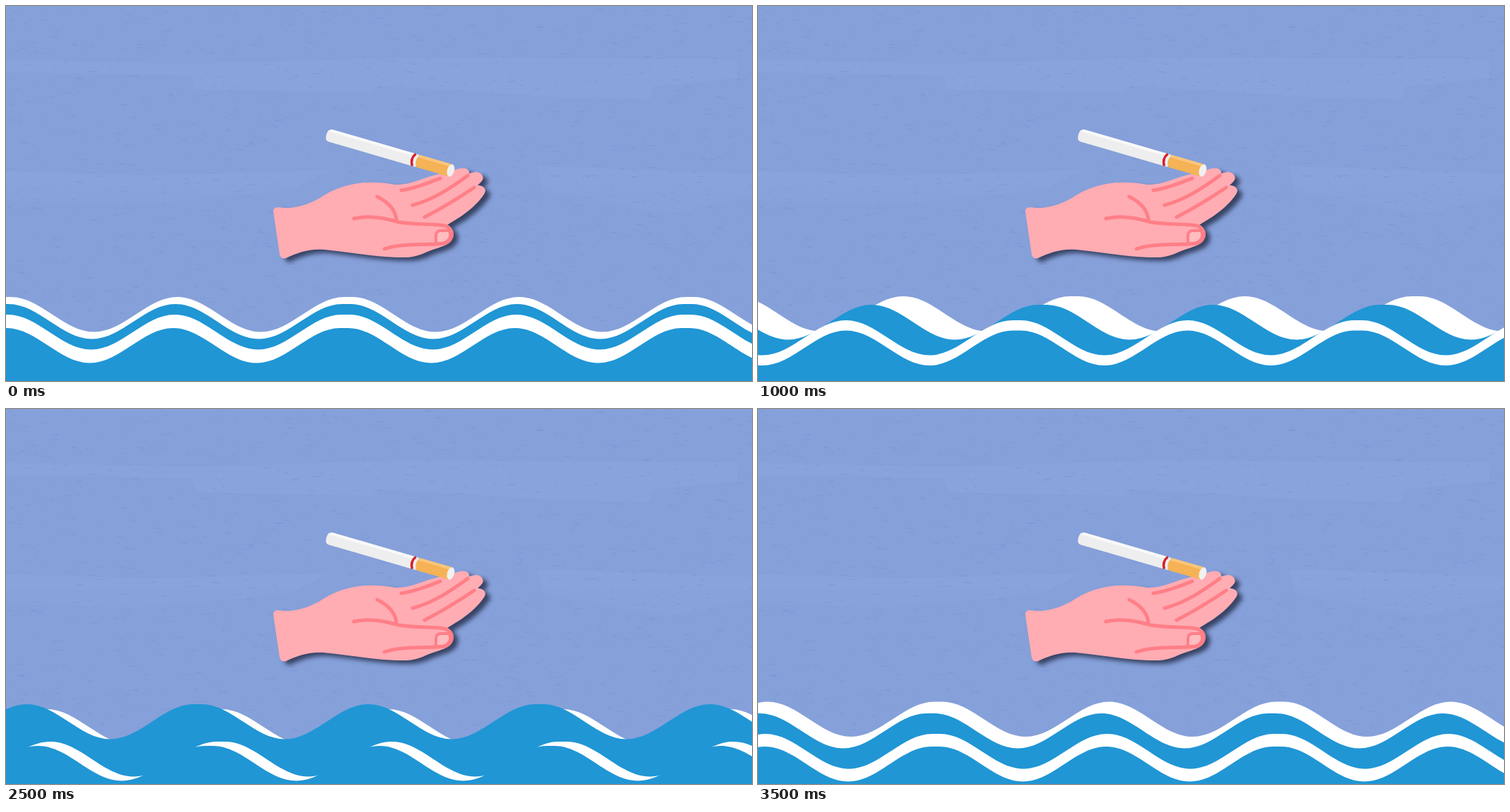
Recreate the animation shown at these times as an HTML page. Size 1055 by 531 pixels, loop 4000 ms.

```html
<!DOCTYPE html>
<html lang="en">
<head>
<meta charset="utf-8">
<title>Hand above the waves</title>
<style>
  html, body { margin: 0; width: 100%; height: 100%; overflow: hidden; background: #86a0da; }
  svg { display: block; width: 100vw; height: 100vh; }
  .hand { filter: drop-shadow(7px 5px 3px rgba(28, 36, 62, .75)); }
  .lines { fill: none; stroke: #ff7f87; stroke-width: 5; stroke-linecap: round; stroke-linejoin: round; }
</style>
</head>
<body>
<svg viewBox="0 0 1055 531" preserveAspectRatio="none">
  <rect width="1055" height="531" fill="#86a0da"/>
  <g fill="#8ba5de" opacity=".6">
    <path d="M0 76 L260 82 L560 73 L1034 75 V102 L915 114 L910 132 L780 129 L526 113 L520 123 L268 118 L262 98 L0 94Z"/>
    <path d="M0 234 L200 240 L460 232 L400 262 L180 281 L0 275Z"/>
    <path d="M750 226 L1055 238 V268 L940 294 L760 262Z"/>
  </g>
  <path id="grain" fill="none" stroke="#6f8ac8" stroke-width=".8" opacity=".5"/>

  <g id="waves"></g>

  <path class="hand" fill="#ffacb3" d="M378 291 Q378 285 384 285 L395 286 C416 286 435 278 450 268
    C480 250 515 246 550 253 C572 254 590 243 612 238 L642 230 C650 228 656 232 655 237 L664 235
    C673 235 678 243 672 249 L667 254 C674 254 680 258 677 265 C665 285 641 300 624 310
    C633 314 634 323 631 330 C627 338 618 340 610 343 C595 347 585 355 568 356
    C530 357 490 349 450 345 C430 343 410 350 396 357 Q389 359 387 352Z"/>
  <g class="lines">
    <path d="M559 261 C580 258 595 251 614 244"/>
    <path d="M575 282 C605 274 630 257 653 240"/>
    <path d="M592 299 C617 286 640 272 662 257"/>
    <path d="M525 270 C541 278 551 288 552 303"/>
    <path d="M608 336 V325 Q608 318 616 318 L627 318 Q632 331 618 336Z" fill="#ffbcc1" stroke-width="4"/>
    <path d="M492 301 C515 295 540 302 556 306 C580 310 605 308 620 311 C635 315 633 332 621 336
      C600 339 560 335 535 344"/>
  </g>

  <g transform="translate(457 183) rotate(16.2)">
    <path d="M2 -9 H130 V9 H2 Q-4 9 -4 0 Q-4 -9 2 -9Z" fill="#eee"/>
    <path d="M2 -9 H124 L122 -5 H-1Z" fill="#f9f9f9"/>
    <path d="M125 -9 Q119 0 125 9" fill="none" stroke="#d81e2c" stroke-width="3.5"/>
    <path d="M131 -9 H178 V9 H131 Q125 0 131 -9Z" fill="#f5b255"/>
    <path d="M131 -9 H178 V-5 H129Z" fill="#fbc67a"/>
    <path d="M130 0 H174 M132 4 H175" stroke="#fbc273" stroke-dasharray="1 4"/>
    <ellipse cx="179" rx="5" ry="9" fill="#f1f1f1"/>
  </g>
</svg>
<script>
  const STEP = 500;
  const BLUE = '#2096d5';

  // Each pose: [centre of the flat crest, crest height] per layer, back to front.
  const poses = [
    [[484, 412], [481, 422], [480, 437], [478, 456]],
    [[466, 411.5], [441, 422], [423, 441], [422, 457]],
    [[447, 411], [402, 423], [366, 445], [366, 459.5]],
    [[398, 412.5], [351, 446], [313, 471], [379, 497]],
    [[347, 432], [313, 441.5], [308, 471], [330, 471]],
    [[299, 425], [271, 418], [304, 471], [287, 477]],
    [[276, 420], [258, 425], [278, 466], [268, 478]],
    [[255, 414.5], [244, 431], [252, 460], [251, 478]]
  ];

  // One period of 483 px: a flattened crest, then a round one.
  const down = 'c43 0 75 49.5 118 49.5', up = 'c43 0 75 -49.5 118 -49.5';
  const period = 'h11' + (down + up).repeat(2);
  const wavePath = 'M-971.5 0' + period.repeat(5) + 'v200H-971.5Z';

  const layers = ['#fff', BLUE, '#fff', BLUE].map(color => {
    const path = document.createElementNS('http://www.w3.org/2000/svg', 'path');
    path.setAttribute('d', wavePath);
    path.setAttribute('fill', color);
    document.getElementById('waves').append(path);
    return path;
  });

  function drawGrain(count) {
    let seed = 7, d = '';
    const random = () => (seed = seed * 16807 % 2147483647) / 2147483647;
    for (let i = 0; i < count; i++) {
      const length = 2 + 9 * random() ** 2;
      const tilt = random() * 3 - 1;
      d += `M${(random() * 1055).toFixed(1)} ${(random() * 470).toFixed(1)}q${length / 2} ${-tilt} ${length} ${tilt}`;
    }
    document.getElementById('grain').setAttribute('d', d);
  }

  function render(now) {
    const pose = poses[Math.floor(now / STEP) % poses.length];
    layers.forEach((layer, i) => layer.setAttribute('transform', `translate(${pose[i]})`));
    requestAnimationFrame(render);
  }

  drawGrain(1100);
  render(performance.now());
</script>
</body>
</html>
```
